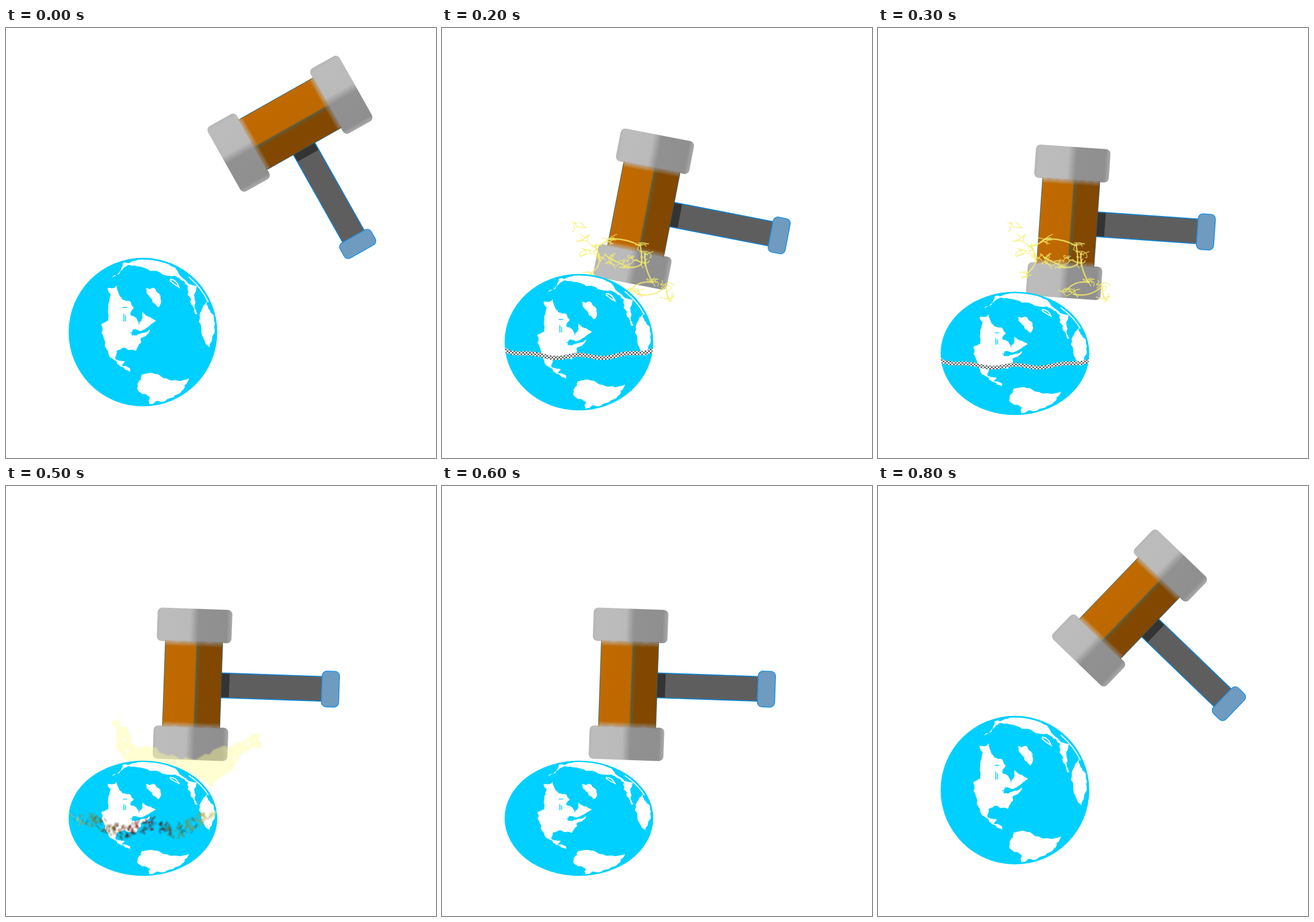
Animation, 748 px wide and 748 px high, one loop 0.9 s. Source, as an HTML page with a canvas:

```html
<!DOCTYPE html>
<html lang="en">
<head>
<meta charset="utf-8">
<title>Hammer and globe</title>
<style>
  html, body { margin: 0; width: 100%; height: 100%; overflow: hidden; background: #fff; }
  canvas { display: block; }
</style>
</head>
<body>
<canvas id="stage" width="748" height="748"></canvas>
<script>
const ctx = document.getElementById('stage').getContext('2d');
const STEP = 100, STEPS = 9;
const OCEAN = '#00d0ff', YELLOW = '#f4ed68';
const RADIUS = 129.3, CENTER_X = 238.2, CENTER_Y = 529;

// Hammer angle and head centre
const raised = [60.6, 494, 166.5], falling = [36, 409, 234], hit = [11, 351, 315], sinking = [4, 331, 338],
  rest = [2, 324.5, 345], lifting = [28.5, 379.7, 254], rising = [43.9, 437.5, 212.3];
const swing = [raised, falling, hit, sinking, rest, rest, rest, lifting, rising];
// Globe centre y and vertical radius
const round = [529, 129], dented = [546.5, 118.5], pressed = [566, 107], flat = [578, 100];
const squash = [round, round, dented, pressed, flat, flat, flat, round, round];

function makeRandom(seed) {
  return () => (seed = (seed * 16807) % 2147483647) / 2147483647;
}

function points(text) {
  return text.split(',').map(pair => pair.trim().split(' ').map(Number));
}

// Closed outline whose edges are broken up by midpoint displacement
function ragged(corners, amount, seed) {
  const random = makeRandom(seed);
  let line = corners;
  for (let level = 0; level < 3; level++) {
    line = line.flatMap(([x, y], i) => {
      const [nx, ny] = line[(i + 1) % line.length];
      const shift = (random() - .5) * amount;
      return [[x, y], [(x + nx) / 2 + (ny - y) * shift, (y + ny) / 2 - (nx - x) * shift]];
    });
  }
  const path = new Path2D();
  line.forEach(p => path.lineTo(...p));
  path.closePath();
  return path;
}

const northAmerica = points(`177 452, 193 448, 202 472, 215 475, 222 486, 216 498, 228 507, 231 518, 237 494,
  251 503, 261 510, 247 520, 232 527, 221 524, 219 535, 235 531, 253 523, 234 540, 235 547, 226 562, 205 556,
  193 561, 191 577, 207 581, 202 588, 216 592, 217 598, 198 588, 181 573, 166 530, 166 515, 178 509, 178 486,
  182 464`);
const greenland = points('243 453, 257 452, 269 466, 265 486, 250 468');
const eurasia = points(`184 434, 203 409, 240 402, 287 414, 332 449, 328 472, 333 497, 329 498, 316 464, 317 449,
  300 434, 285 431, 263 423, 240 417, 213 412, 197 428`);
const africa = points('350 473, 362 500, 363 526, 354 556, 341 535, 342 487');
const southAmerica = points(`229 618, 236 603, 264 602, 291 613, 318 609, 304 634, 277 649, 249 655, 250 642,
  228 627`);
const land = [northAmerica, greenland, eurasia, africa, southAmerica].map((shape, i) => ragged(shape, .3, 40 + i));
const coasts = new Path2D('M285 437 Q296 437 301 451 Q292 446 285 439 M318 433 Q341 453 352 477');
const inlets = new Path2D('M203 486 h8 M205 497 v14 M208 500 v10 M216 530 h4 M226 531 h5');

const splash = ragged(points(`182 409, 203 397, 198 416, 212 419, 217 444, 230 455, 262 455, 320 474, 388 455,
  404 444, 440 430, 446 453, 412 465, 396 490, 358 528, 238 495, 208 478, 190 452, 192 436`), .4, 8);
const bubbles = points('205 441, 211 462, 398 474, 421 449');
const bolts = ['258 428, 266 380, 290 367, 345 379, 347 411, 313 411, 288 398', '353 394, 367 443, 328 456',
  '340 463, 390 449, 394 470'].map(points);
const sparks = [...bolts.flat(), ...points('238 346, 246 367, 246 391, 270 398, 290 410, 327 403')];

function circle(x, y, r) {
  ctx.beginPath();
  ctx.arc(x, y, r, 0, Math.PI * 2);
}

function gradient(x0, x1, stops) {
  const g = ctx.createLinearGradient(x0, 0, x1, 0);
  stops.forEach(([at, color]) => g.addColorStop(at, color));
  return g;
}

const steel = gradient(-65, 65, [[0, '#b5b5b5'], [.05, '#bcbcbc'], [.44, '#bababa'], [.55, '#919191'],
  [.93, '#8f8f8f'], [1, '#aaa']]);
const wood = gradient(-50, 50, [[0, '#c06a00'], [.53, '#bd6800'], [.56, '#5f5a38'], [.62, '#824800'],
  [1, '#824700']]);
const ember = gradient(107, 369, [[0, '#f8f3a0'], [.17, '#8e7218'], [.34, '#54300c'], [.42, '#780808'],
  [.53, '#8e0008'], [.62, '#3b1510'], [.72, '#8a701b'], [.86, '#a68d28'], [1, '#f8f7a0']]);

const hatch = (() => {
  const tile = document.createElement('canvas');
  tile.width = tile.height = 6;
  const t = tile.getContext('2d');
  t.fillStyle = '#fff';
  t.fillRect(0, 0, 6, 6);
  t.lineWidth = .9;
  t.stroke(new Path2D('M-1 -1 L7 7 M-1 7 L7 -1'));
  return ctx.createPattern(tile, 'repeat');
})();

function box(x, y, w, h, r, fill, edge) {
  ctx.beginPath();
  ctx.roundRect(x, y, w, h, r);
  ctx.fillStyle = fill;
  ctx.fill();
  if (!edge) return;
  ctx.strokeStyle = edge;
  ctx.lineWidth = 1.6;
  ctx.stroke();
}

function drawHammer(angle, x, y) {
  ctx.save();
  ctx.translate(x, y);
  ctx.rotate(angle * Math.PI / 180);
  box(48, -21.5, 180, 43, 0, '#5e5e5e', '#0b84d8');
  box(48, -20.5, 16, 41, 0, '#343434');
  box(225, -31, 30, 62, 8, '#6f9bc0', '#2492e0');
  box(-65, -131.5, 130, 58, 8, steel);
  box(-65, 73.5, 130, 58, 8, steel);
  box(-50, -75, 100, 150, 0, wood);
  ctx.fillStyle = 'rgba(0, 100, 150, .6)';
  ctx.fillRect(-50.5, -72, 1.2, 144);
  ctx.fillRect(49.5, -72, 1.2, 144);
  // Soft joints between wood and steel
  ctx.fillStyle = steel;
  for (let i = 0; i < 10; i++) {
    ctx.globalAlpha = 1 - i / 10;
    ctx.fillRect(-49, -76 + i, 98, 1);
    ctx.fillRect(-49, 75 - i, 98, 1);
  }
  ctx.restore();
}

function drawGlobe() {
  ctx.fillStyle = OCEAN;
  circle(CENTER_X, CENTER_Y, RADIUS);
  ctx.fill();
  ctx.save();
  circle(CENTER_X, CENTER_Y, RADIUS - 3);
  ctx.clip();
  ctx.fillStyle = ctx.strokeStyle = '#fff';
  land.forEach(shape => ctx.fill(shape));
  ctx.lineWidth = 2;
  ctx.stroke(coasts);
  ctx.strokeStyle = OCEAN;
  ctx.lineWidth = 1.5;
  ctx.stroke(inlets);
  ctx.restore();
}

function drawHatchedCrack() {
  ctx.save();
  circle(CENTER_X, CENTER_Y, RADIUS);
  ctx.clip();
  ctx.beginPath();
  for (let x = 108; x <= 368; x += 4) {
    const side = (x - CENTER_X) / RADIUS;
    ctx.lineTo(x, 556 - 15 * side ** 4 + 3 * Math.sin((x - 178) / 13));
  }
  ctx.strokeStyle = hatch;
  ctx.lineWidth = 8;
  ctx.lineJoin = 'round';
  ctx.stroke();
  ctx.restore();
}

function drawLightning() {
  const random = makeRandom(71);
  ctx.save();
  ctx.globalAlpha = .8;
  ctx.strokeStyle = YELLOW;
  ctx.lineCap = ctx.lineJoin = 'round';
  ctx.lineWidth = 2.4;
  for (const bolt of bolts) {
    ctx.beginPath();
    ctx.moveTo(...bolt[0]);
    for (let i = 1; i < bolt.length; i++) {
      const [x0, y0] = bolt[i - 1], [x1, y1] = bolt[i];
      const bend = random() - .5;
      ctx.quadraticCurveTo((x0 + x1) / 2 + (y1 - y0) * bend, (y0 + y1) / 2 - (x1 - x0) * bend, x1, y1);
    }
    ctx.stroke();
  }
  ctx.lineWidth = 1.3;
  for (const [x, y] of sparks) {
    const near = () => [x + (random() - .5) * 30, y + (random() - .5) * 20];
    ctx.beginPath();
    for (let i = 0; i < 4; i++) {
      ctx.moveTo(...near());
      ctx.bezierCurveTo(...near(), ...near(), ...near());
    }
    ctx.stroke();
  }
  ctx.restore();
}

function drawSplash() {
  ctx.save();
  ctx.filter = 'blur(1px)';
  ctx.fillStyle = 'rgba(255, 251, 150, .86)';
  ctx.fill(splash);
  ctx.fillStyle = '#fff';
  bubbles.forEach(([x, y]) => {
    circle(x, y, 4.5);
    ctx.fill();
  });
  ctx.restore();
}

function drawEmbers() {
  const random = makeRandom(19);
  ctx.save();
  ctx.filter = 'blur(.8px)';
  ctx.lineCap = 'round';
  for (let i = 0; i < 230; i++) {
    const x = 109 + random() * 258;
    const side = Math.abs(x - CENTER_X) / RADIUS;
    const spread = Math.min(1, (1.04 - side) * 3.4);
    const y = 594 - 27 * side ** 4 + spread * (7 * Math.sin((x - 178) / 15) + (random() - .5) * 22);
    ctx.strokeStyle = i % 4 ? ember : `rgba(35, 20, 5, ${.65 * spread})`;
    ctx.lineWidth = 1.2 + random() * 2.2;
    ctx.beginPath();
    ctx.moveTo(x, y);
    ctx.quadraticCurveTo(x + random() * 10 - 5, y + 4, x + random() * 8 - 4, y + random() * 12 - 5);
    ctx.stroke();
  }
  ctx.restore();
}

function draw(step) {
  const cracking = step === 2 || step === 3, burning = step === 4 || step === 5;
  const [globeY, globeRadius] = squash[step];
  const fade = step === 5 ? .5 : 1;
  ctx.fillStyle = '#fff';
  ctx.fillRect(0, 0, 748, 748);
  drawHammer(...swing[step]);

  ctx.globalAlpha = fade;
  if (cracking) drawLightning();
  if (burning) drawSplash();
  ctx.globalAlpha = 1;

  ctx.save();
  ctx.translate(0, globeY);
  ctx.scale(1, globeRadius / 129);
  ctx.translate(0, -CENTER_Y);
  drawGlobe();
  if (cracking) drawHatchedCrack();
  ctx.restore();

  ctx.globalAlpha = fade;
  if (burning) drawEmbers();
  ctx.globalAlpha = 1;
}

let shown = -1;
const start = performance.now();
function tick() {
  const step = Math.floor((performance.now() - start) / STEP) % STEPS;
  if (step !== shown) draw(shown = step);
  requestAnimationFrame(tick);
}
tick();
</script>
</body>
</html>
```
